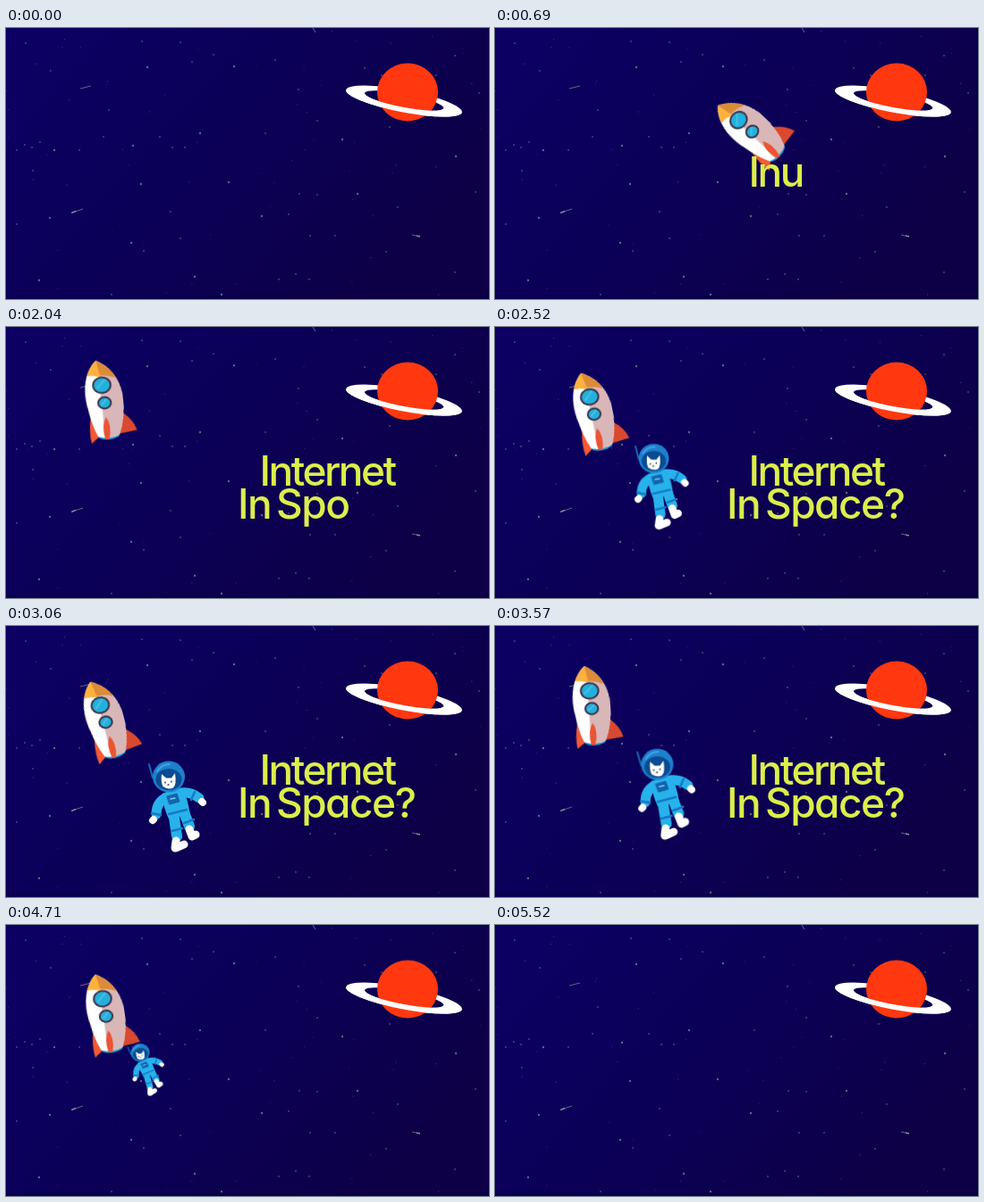
An HTML page that plays this animation: 540x304 px, repeating every 5.7 s.

```html
<!DOCTYPE html>
<html lang="en">
<head>
<meta charset="utf-8">
<title>Internet In Space?</title>
<style>
html, body { margin: 0; width: 100%; height: 100%; overflow: hidden; background: #0c0058; }
svg { display: block; width: 100vw; height: 100vh; }
#title {
  font: 500 46px Inter, "Open Sans", sans-serif;
  font-feature-settings: "cv11";
  letter-spacing: -2.5px;
  fill: #dcee4a;
  white-space: pre;
}
#question { letter-spacing: -1.5px; word-spacing: -5px; }
#rocket, #cat, #title { animation: 5700ms linear infinite; }
#rocket { animation-name: fly; }
#cat { animation-name: drift; }
#title { animation-name: rise; }

@keyframes fly {
  0%, 4.21% { transform: translate(590px, 146px) rotate(-58deg); }
  12.1% { transform: translate(287px, 115px) rotate(-47deg); }
  14.21% { transform: translate(210px, 99px) rotate(-42deg); animation-timing-function: ease-out; }
  19.8% { transform: translate(76px, 84px) rotate(-30deg); animation-timing-function: ease-in-out; }
  26.32% { transform: translate(111.5px, 80.5px) rotate(-20deg); animation-timing-function: ease-in-out; }
  30% { transform: translate(113px, 94px) rotate(-16deg); animation-timing-function: ease-in-out; }
  35.6% { transform: translate(110px, 83px) rotate(-6deg); animation-timing-function: ease-in-out; }
  40.7% { transform: translate(112px, 108px) rotate(-16deg); animation-timing-function: ease-in; }
  44.21% { transform: translate(110.5px, 96px) rotate(-12deg); animation-timing-function: ease-out; }
  47% { transform: translate(109px, 83px) rotate(-2deg); animation-timing-function: ease-in-out; }
  53.7% { transform: translate(111px, 106px) rotate(-15deg); animation-timing-function: ease-in-out; }
  60.2% { transform: translate(109px, 83px) rotate(-1deg); animation-timing-function: ease-in; }
  62.63% { transform: translate(108px, 90.5px) rotate(-4deg); animation-timing-function: ease-out; }
  66.7% { transform: translate(111px, 106px) rotate(-14deg); animation-timing-function: ease-in-out; }
  74% { transform: translate(109px, 83px) rotate(0deg); animation-timing-function: ease-in-out; }
  88.42%, 92.4% { transform: translate(113px, 109px) rotate(-13deg); animation-timing-function: ease-in; }
  96.8%, 100% { transform: translate(113px, -60px) rotate(-13deg); }
}
@keyframes drift {
  0%, 37.4% { transform: translate(112px, 100px) rotate(-20deg) scale(0); animation-timing-function: ease-out; }
  44.21% { transform: translate(184.5px, 179.5px) rotate(1deg) scale(.94); animation-timing-function: ease-out; }
  52% { transform: translate(190px, 205px) rotate(0deg) scale(1); animation-timing-function: ease-in-out; }
  60% { transform: translate(190px, 184px) rotate(-1deg) scale(1); animation-timing-function: ease-in; }
  62.63% { transform: translate(190px, 189px) rotate(-1deg) scale(1); animation-timing-function: ease-out; }
  66.7% { transform: translate(190px, 201px) rotate(0deg) scale(1); animation-timing-function: ease-in-out; }
  71% { transform: translate(190px, 190px) rotate(-1deg) scale(1); animation-timing-function: ease-in; }
  74.21% { transform: translate(190px, 197px) rotate(0deg) scale(1); animation-timing-function: ease-out; }
  78.5% { transform: translate(190px, 203px) rotate(0deg) scale(1); animation-timing-function: ease-in-out; }
  87.7%, 100% { transform: translate(112px, 105px) rotate(-20deg) scale(0); }
}
@keyframes rise {
  0%, 67.37% { transform: none; animation-timing-function: cubic-bezier(.37, 0, .63, 1); }
  84.2%, 100% { transform: translateY(-252px); }
}
</style>
</head>
<body>
<svg viewBox="0 0 540 304" preserveAspectRatio="none">
  <defs>
    <linearGradient id="sky" x2="1" y2=".5">
      <stop stop-color="#0c0064"/><stop offset=".55" stop-color="#0b0056"/><stop offset="1" stop-color="#0d0047"/>
    </linearGradient>
    <clipPath id="front"><path d="M-70 0H70V20H-70z"/></clipPath>
    <clipPath id="hull"><path d="M104 37C89 49 86 72 90 91Q92 108 98 122Q110 127 122 122Q130 104 130 82C130 62 120 45 104 37z"/></clipPath>
    <path id="ring" fill="#fff" fill-rule="evenodd" d="M-66 0a66 12.5 0 1 0 132 0a66 12.5 0 1 0-132 0zM-45-.5a45 7.5 0 1 0 90 0a45 7.5 0 1 0-90 0z"/>
  </defs>

  <rect width="540" height="304" fill="url(#sky)"/>
  <rect y="300" width="540" height="4" fill="#080040" opacity=".4"/>

  <use href="#ring" transform="translate(445 82) rotate(11)"/>
  <ellipse cx="449" cy="72" rx="34" ry="32.5" fill="#ff3810"/>
  <g transform="translate(445 82) rotate(11)"><use href="#ring" clip-path="url(#front)"/></g>

  <g id="stars" fill="#a9a0a0" stroke="#a9a0a0" stroke-width="0">
    <path stroke-width="1" opacity=".6" d="M83 68l12-3M74 207l12-4M343 0l3 5M454 232l9 2"/>
    <path stroke-width="1.6" opacity=".7" d="M73 207.5l5-2M459 233l4 1"/>
  </g>

  <g id="cat"><g transform="translate(-190 -197)" stroke-linecap="round" stroke-linejoin="round" fill="none">
    <path d="M160 149l4 15" stroke="#1769b5" stroke-width="2"/>
    <path d="M180 186Q168 191 168 205M197 181Q207 180 216 187" stroke="#27b2ec" stroke-width="11"/>
    <path d="M187 202L191 230M198 200L205 219" stroke="#27b2ec" stroke-width="12"/>
    <path d="M163 204l10 2M211 180l-4 9M185 224l12-3M199 215l11-4" stroke="#1678c4" stroke-width="2.5"/>
    <path d="M165 211l-1 1M219 191l1 1" stroke="#fff" stroke-width="8"/>
    <path d="M190 235l-1 8M190 243l9-4M205 222l3 8M208 230l4-2" stroke="#fff" stroke-width="9"/>
    <path d="M176 183L196 177Q202 189 204 204L183 209Q177 196 176 183z" fill="#27b2ec" stroke="#27b2ec" stroke-width="3"/>
    <path d="M182 205l20-5" stroke="#1678c4" stroke-width="2.5"/>
    <path d="M180 185l11-3 3 9-11 3z" fill="#1264ad" stroke="#1264ad"/>
    <path d="M184 188l5-1" stroke="#78d4f4" stroke-width="1.5"/>
    <ellipse cx="182" cy="163" rx="18" ry="17.5" fill="#1d80cd"/>
    <ellipse cx="182" cy="166" rx="14.5" ry="12" fill="#0b4b91"/>
    <path d="M174 160L179 164.500H185L189 159Q191 172 187 175.500Q181 178 175.500 174Q173 169 174 160z" fill="#fff"/>
    <path d="M178 169v1M185 168v1M181 172h1" stroke="#173a68" stroke-width="1.4"/>
    <path d="M169 157Q174 149 183 149" stroke="#3fa5e2" stroke-width="2"/>
  </g></g>

  <g id="rocket"><g transform="translate(-109 -83)">
    <path d="M92 99Q88 116 90 129L101 121z" fill="#f15a35"/>
    <path d="M128 98Q139 107 142 119L122 121z" fill="#d9492f"/>
    <path d="M97 118Q109 125 123 118L121 124Q109 129 99 124z" fill="#149bcd"/>
    <g clip-path="url(#hull)">
      <path d="M80 30h60v90q-30 9-60 0z" fill="#fff"/>
      <path d="M104 30Q107 78 105 126H140V30z" fill="#d9b7b8"/>
      <path d="M80 30H107V56Q95 50 80 57z" fill="#ffb13d"/>
      <path d="M103 30L107 54Q116 54 128 60V30z" fill="#dc8b38"/>
    </g>
    <g fill="#24b0dc" stroke="#3a3348" stroke-width="2">
      <ellipse cx="108" cy="65" rx="9.8" ry="8.8"/><ellipse cx="109" cy="85" rx="7.2" ry="6.4"/>
    </g>
    <path d="M102 68l10-9M105 87l7-6" stroke="#77d7ef" stroke-width="2" opacity=".4"/>
    <path d="M109 101Q102 111 106 126H110Q115 111 109 101z" fill="#ea5434"/>
  </g></g>

  <g id="title">
    <text x="283.500" y="177.500"><tspan></tspan><tspan></tspan></text>
    <text id="question" x="259" y="215"><tspan></tspan><tspan></tspan></text>
  </g>
</svg>
<script>
const LOOP = 5700, TYPE_START = 390, CHAR_MS = 120;
const lines = [
  { text: "Internet", decoy: "Lhufaosw", first: 0 },
  { text: "In Space?", decoy: "Td bqoumw", first: 8 }
];
const rows = [...document.querySelectorAll("#title text")].map(row => row.children);

function addStar(x, y, r, opacity) {
  const star = document.createElementNS("http://www.w3.org/2000/svg", "ellipse");
  const attrs = { cx: x, cy: y, rx: r, ry: r * 1.15, opacity };
  for (const key in attrs) star.setAttribute(key, attrs[key]);
  document.getElementById("stars").append(star);
}

const bright = [151,175, 249,173, 211,279, 393,186, 503,144, 158,44, 142,132, 255,43, 217,118,
  54,137, 376,125, 49,213, 140,241, 286,211, 37,283, 241,299];
const dim = [22,17, 50,48, 115,92, 152,15, 195,16, 208,38, 232,30, 401,45, 429,111, 305,282, 368,233,
  340,233, 316,209, 348,187, 328,186, 438,201, 525,184, 529,73, 502,31, 481,53, 420,53, 348,104,
  327,69, 301,36, 290,118, 186,134, 200,134, 172,122, 109,122, 38,128, 29,134, 21,131, 12,137,
  82,137, 30,160, 12,220, 184,206, 195,236, 154,250, 118,299, 324,276, 339,282, 425,251, 502,274];
for (let i = 0; i < bright.length; i += 2) addStar(bright[i], bright[i + 1], 1.15, .6);
for (let i = 0; i < dim.length; i += 2) addStar(dim[i], dim[i + 1], .8, .5);

let seed = 17;
const random = () => (seed = seed * 16807 % 2147483647) / 2147483647;
for (let i = 0; i < 60; i++) addStar(random() * 540, random() * 300, .65, .15 + random() * .2);

function type(time) {
  const progress = (time - TYPE_START) / CHAR_MS;
  lines.forEach(({ text, decoy, first }, i) => {
    const [typed, ghost] = rows[i];
    const position = progress - first;
    const index = Math.floor(position);
    typed.textContent = text.slice(0, Math.max(0, index));
    ghost.textContent = decoy[index] || "";
    const phase = position - index;
    ghost.setAttribute("opacity", phase < .24 ? .06 : phase < .49 ? .18 : 1);
  });
}

const start = performance.now();
function frame() {
  type((performance.now() - start) % LOOP);
  requestAnimationFrame(frame);
}
frame();
</script>
</body>
</html>
```
